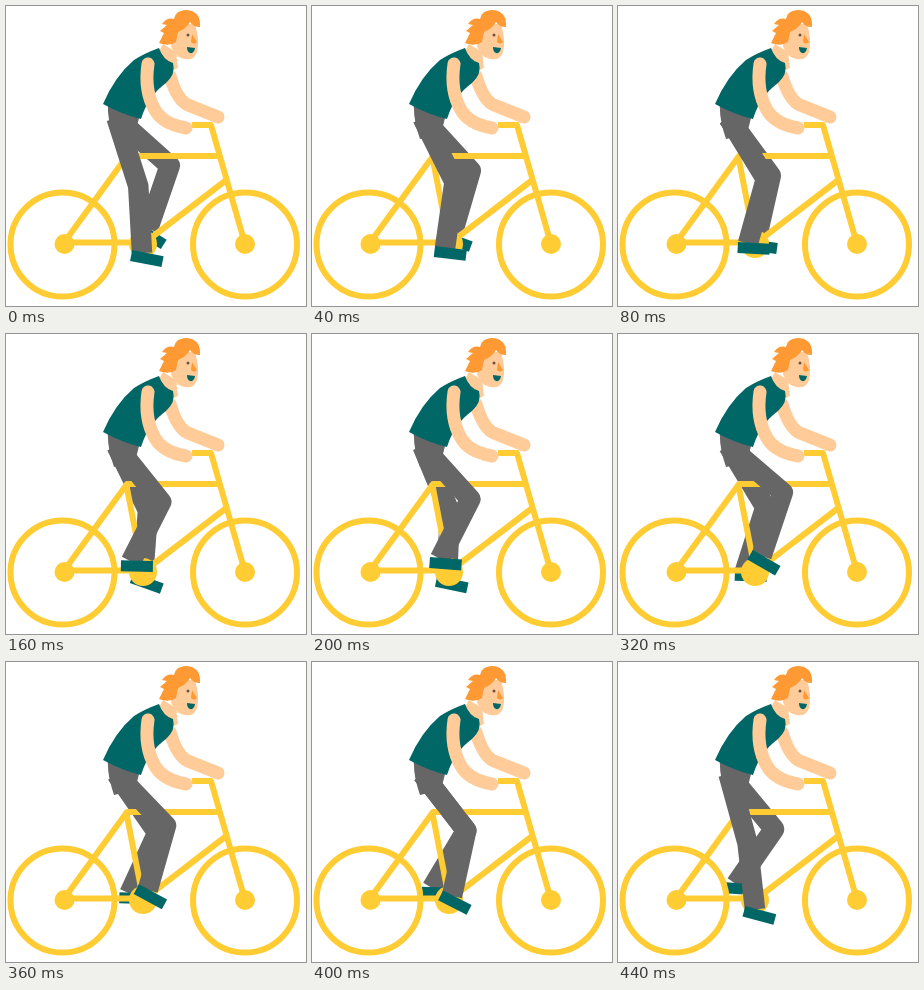
Animation of 300x300 px, one loop 480 ms. Source, as an HTML page:

```html
<!DOCTYPE html>
<html lang="en">
<head>
<meta charset="utf-8">
<title>Cyclist</title>
<style>
  html, body { margin: 0; width: 100%; height: 100%; overflow: hidden; background: #fff; }
  svg { display: block; width: 100vw; height: 100vh; }
  .line { fill: none; }
  .bike { stroke: #ffcc33; stroke-width: 6; }
  .hub { fill: #ffcc33; stroke: none; }
  .skin { stroke: #ffcc99; stroke-width: 13; stroke-linecap: round; stroke-linejoin: round; }
  .trousers { stroke: #666; stroke-width: 20.5; stroke-linejoin: round; }
  .green { fill: #006666; }
</style>
</head>
<body>
<svg viewBox="0 0 300 300">
  <g id="far">
    <path class="line trousers"/>
    <rect class="green" x="-10" width="32" height="11"/>
  </g>

  <path class="line skin" d="M164 70Q171 94 182 99L212 111"/>

  <g class="line bike">
    <circle cx="56.5" cy="238.5" r="52"/>
    <circle cx="239" cy="238.5" r="52"/>
    <path d="M57 238L121 150H214M57 236.500H137L120 149M137 238L219 175M186 119H205L239 238" stroke-linejoin="round"/>
    <circle class="hub" cx="58.500" cy="238" r="10"/>
    <circle class="hub" cx="239" cy="238" r="10"/>
    <circle class="hub" cx="137" cy="238" r="14"/>
  </g>

  <g id="near">
    <path class="line trousers"/>
    <rect class="green" x="-10" width="32" height="11"/>
  </g>
  <path d="M102 98Q101 113 108 133L129 128L134 108Z" fill="#666"/>

  <path d="M157 38L170 46L172 62L163 66L152 47Z" fill="#ffcc99"/>
  <path class="green" d="M97 98Q109 70 128 54Q139 47 153 42Q157 54 167 57Q170 68 160 77Q142 90 135 113Q115 108 97 98Z"/>
  <path class="line skin" d="M142 58Q138 85 149 104Q157 118 180 122"/>

  <path d="M167 18H189Q194 34 191 46Q188 55 178 53Q168 51 165 40Z" fill="#ffcc99"/>
  <path d="M194 21Q195 4 179 4Q169 5 168 13Q161 11 156 18L161 19L154 25L158 27L153 37Q163 41 170 36L172 26Q180 23 184 16Q187 21 194 21Z" fill="#ff9933"/>
  <path d="M186 28L191 36Q188 39 185 36Z" fill="#ff9933"/>
  <circle cx="182" cy="29" r="1.500" fill="#665544"/>
  <path class="green" d="M181 41L189 42Q188 48 184 47Q181 46 181 41Z"/>
</svg>
<script>
  const STEP = 40, STEPS = 12;
  const HIP = { x: 110.5, y: 112 }, THIGH = 71.5, SHIN = 66;

  // Pedal keys: step, ankle x, ankle y, shoe angle
  const legs = {
    near: [[0, 136, 246, 11], [2, 130, 236.5, 3], [4, 125, 226.5, 1], [6, 131, 221, 8],
           [8, 143.5, 221, 30], [10, 140, 233, 27], [11, 137, 246.5, 15]],
    far: [[0, 142, 222, 32], [2, 138, 234, 8], [4, 137, 242, 20], [6, 133, 246, 4],
          [8, 127, 236, 2], [10, 120, 225, 2], [11, 118, 221, 4]]
  };

  function ankleAt(keys, step) {
    const i = keys.findLastIndex(key => key[0] <= step);
    const a = keys[i], b = keys[i + 1] || a;
    const k = b === a ? 0 : (step - a[0]) / (b[0] - a[0]);
    return a.slice(1).map((v, j) => v + (b[j + 1] - v) * k);
  }

  function poseLeg(id, step) {
    const [x, y, angle] = ankleAt(legs[id], step);
    const dx = x - HIP.x, dy = y - HIP.y, d = Math.hypot(dx, dy);
    const along = (THIGH ** 2 - SHIN ** 2 + d * d) / (2 * d);
    const bend = Math.sqrt(Math.max(0, THIGH ** 2 - along ** 2));
    const kneeX = HIP.x + (dx * along + dy * bend) / d;
    const kneeY = HIP.y + (dy * along - dx * bend) / d;
    const [leg, shoe] = document.getElementById(id).children;
    leg.setAttribute("d", `M${HIP.x} ${HIP.y}L${kneeX} ${kneeY}L${x} ${y + 1}`);
    shoe.setAttribute("transform", `translate(${x} ${y}) rotate(${angle})`);
  }

  const start = performance.now();
  function draw() {
    const step = Math.floor((performance.now() - start) / STEP) % STEPS;
    poseLeg("far", step);
    poseLeg("near", step);
    requestAnimationFrame(draw);
  }
  draw();
</script>
</body>
</html>
```
